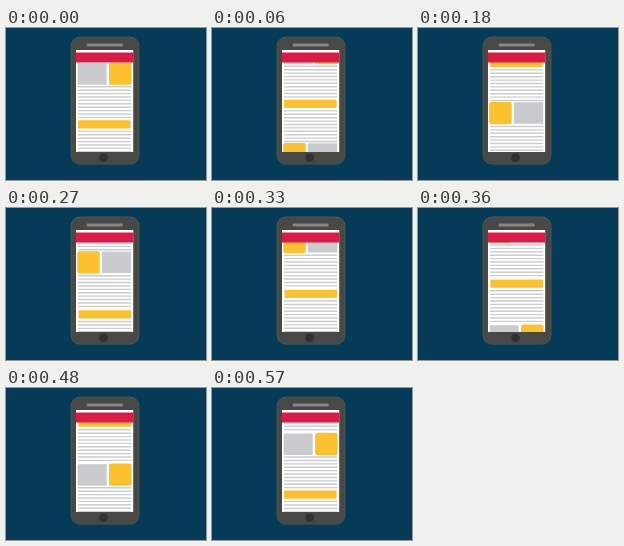
An HTML page with a canvas that plays this animation: 200 by 152 pixels, repeating every 600 ms.

```html
<!DOCTYPE html>
<html lang="en">
<head>
<meta charset="utf-8">
<title>Scrolling phone page</title>
<style>
html, body { margin: 0; width: 100%; height: 100%; overflow: hidden; background: #053b58; }
canvas { display: block; width: 200px; height: 152px; }
</style>
</head>
<body>
<canvas id="stage" width="200" height="152"></canvas>
<script>
const ctx = document.getElementById('stage').getContext('2d');
const LOOP = 600, STEP = 30, PERIOD = 205;
const NAVY = '#053b58', BODY = '#484846', RED = '#dc1a48',
      YELLOW = '#fdc02f', GREY = '#c9cbcd', LINE = '#cbcdce';

function box(x, y, w, h, r, color) {
  ctx.fillStyle = color;
  ctx.beginPath();
  ctx.roundRect(x, y, w, h, r);
  ctx.fill();
}

function lines(top) {
  for (let i = 0; i < 10; i++) box(72, top + i * 3.4, 53.3, 1.4, 0, LINE);
}

// One full period of the page, starting at its first pair of blocks
function page(y) {
  box(71.7, y + 0.6, 29, 21.4, 0.6, GREY);
  box(103, y - 0.2, 22.6, 22.2, 2.2, YELLOW);
  lines(y + 23.4);
  box(72, y + 57.6, 52.6, 8.2, 1, YELLOW);
  lines(y + 68);
  box(71.2, y + 100.8, 22.5, 22.2, 2.2, YELLOW);
  box(95.8, y + 101, 29.4, 21.6, 0.6, GREY);
  lines(y + 124.6);
  box(72.4, y + 159.8, 52.6, 8.2, 1, YELLOW);
  lines(y + 170.4);
}

function phone() {
  box(64.6, 8.6, 68.8, 128, 9.5, '#4d5f4c');
  box(65.3, 9.3, 67.4, 126.6, 9, BODY);
  box(80.7, 15.4, 36, 3, 1, '#858585');
  box(93.2, 125.4, 8.6, 8.6, 4.3, '#30302f');
  box(70, 22, 57.2, 102, 0, '#fff');
}

function draw(now) {
  const t = Math.floor((now % LOOP) / STEP) * STEP;
  const top = 34.7 - PERIOD * t / LOOP;

  ctx.fillStyle = NAVY;
  ctx.fillRect(0, 0, 200, 152);
  phone();

  ctx.save();
  ctx.beginPath();
  ctx.rect(70, 33, 57.2, 91);
  ctx.clip();
  page(top);
  page(top + PERIOD);
  ctx.restore();

  box(70, 24.4, 57.2, 10, 0, RED);
  requestAnimationFrame(draw);
}

draw(0);
</script>
</body>
</html>
```
